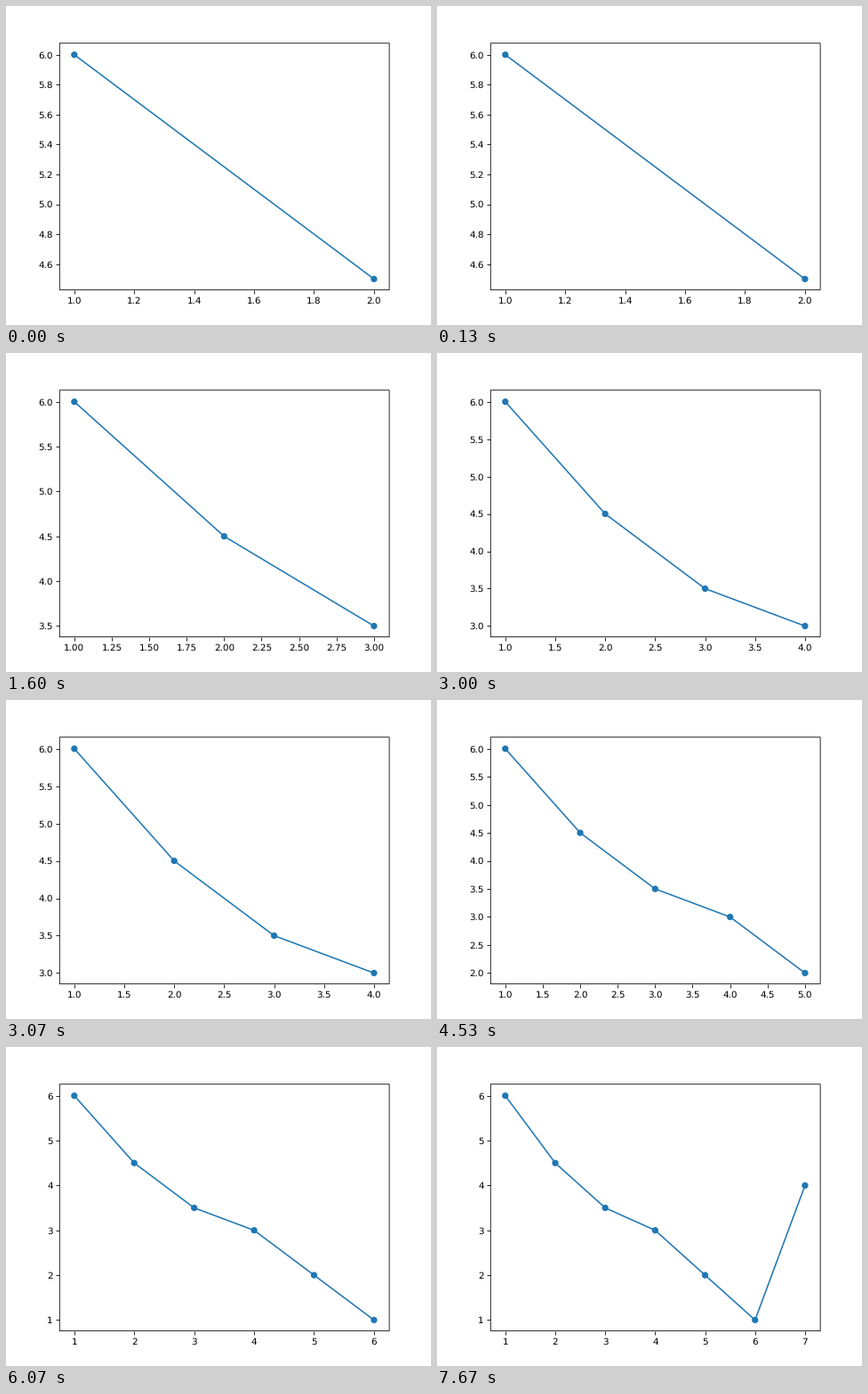
Write a matplotlib script that moves like this. It is 478 by 358 pixels and loops after 8 s.

```python
import matplotlib.pyplot as plt
from matplotlib.animation import FuncAnimation
from matplotlib.collections import EllipseCollection
from matplotlib.patches import Rectangle

DPI = 75
WIDTH, HEIGHT = 478, 358
STEP, LOOP = 20, 8000  # ms

VALUES = [6, 4.5, 3.5, 3, 2, 1, 4]
ADD_TIMES = [1530, 3000, 4530, 6000, 7530]  # ms at which a point is appended

plt.rcParams.update({"font.family": "DejaVu Sans", "text.hinting": "none"})

# The small surplus keeps the pixel size from rounding down.
fig = plt.figure(figsize=((WIDTH + 0.01) / DPI, (HEIGHT + 0.01) / DPI), dpi=DPI)

left, right, top, bottom = 59.95, 430.75, 42.1, 319.0
ax = fig.add_axes([left / WIDTH, 1 - bottom / HEIGHT,
                   (right - left) / WIDTH, (bottom - top) / HEIGHT])

# An unsnapped frame in pixel units gives softer edges than the spines.
ax.spines[:].set_visible(False)
shift = 0.35
ax.add_patch(Rectangle((left + shift, HEIGHT - bottom + shift),
                       right - left, bottom - top, fill=False, lw=0.8,
                       ec="black", snap=False, clip_on=False, zorder=2.5,
                       transform=None))

line, = ax.plot([], [], color="tab:blue")

# Ellipses keep subpixel positions; points still to come lie outside the axes.
total = len(VALUES)
points = list(zip(range(1, total + 1), VALUES))
ax.add_collection(EllipseCollection(
    [7] * total, [7] * total, [0] * total, units="points", offsets=points,
    offset_transform=ax.transData, facecolor="tab:blue", edgecolor="none",
    zorder=2), autolim=False)


def padded(low, high, margin=0.05):
    pad = (high - low) * margin
    return low - pad, high + pad


def update(i):
    now = i * STEP + STEP / 2
    count = 2 + sum(now >= t for t in ADD_TIMES)
    ys = VALUES[:count]
    line.set_data(range(1, count + 1), ys)
    ax.set_xlim(padded(1, count))
    ax.set_ylim(padded(min(ys), max(ys)))
    return line,


anim = FuncAnimation(fig, update, frames=LOOP // STEP, interval=STEP,
                     init_func=lambda: update(0), repeat=True, repeat_delay=0)
plt.show()
```
